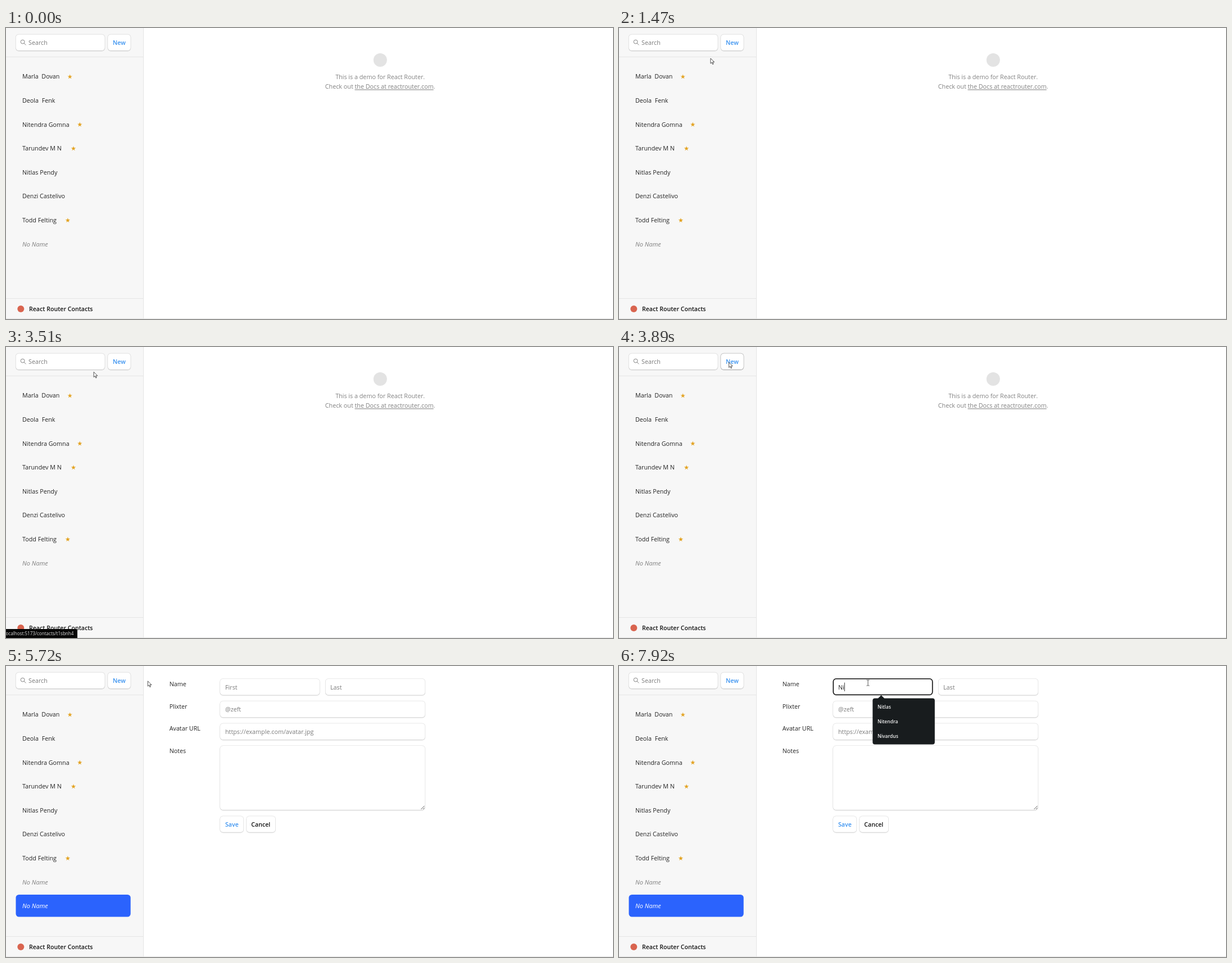
An HTML page that plays this animation: 1080 px wide and 518 px high, repeating every 8 s.

```html
<!DOCTYPE html>
<html lang="en">
<head>
<meta charset="utf-8">
<title>Contacts</title>
<style>
  html, body { margin: 0; width: 100%; height: 100%; overflow: hidden; background: #fff; }
  svg { display: block; width: 100%; height: 100%; }
  text { font: 10.75px "Open Sans", "Noto Sans", sans-serif; fill: #242424; white-space: pre; }
  .bold { font-weight: 600; font-size: 10.6px; fill: #121212; }
  .blue { fill: #3992f0; }
  .soft { fill: #818181; }
  .hint { fill: #7b7b7b; }
  .italic { font-style: italic; font-size: 11px; }
  .mid { text-anchor: middle; }
  .link { text-decoration: underline; }
  .item { font-weight: 600; font-size: 8.5px; fill: #f2f2f2; }
  .status { font-size: 8.1px; fill: #dedede; }
  .white { fill: #fff; }
  .shade { fill: rgba(0,0,0,.07); }
  .edge { fill: rgba(0,0,0,.1); }
  .over .edge { fill: rgba(0,0,0,.26); }
  .line { fill: #e5e5e5; }
  .star { fill: #e3a322; }
  .dark { fill: #181c1e; }
  .cursor { fill: #fff; stroke: #333; stroke-width: .85; stroke-linejoin: round; }
</style>
</head>
<body>
<svg id="stage" viewBox="0 0 1080 518" preserveAspectRatio="none"></svg>
<script>
const LOOP = 8000;
const ROW = { x: 17.5, y: 66.2, w: 204.2, h: 39.5, pitch: 42.6 };

// name, star centre
const people = [
  ["Marla  Dovan", 113.7], ["Deola  Fenk"], ["Nitendra Gomna", 131.3],
  ["Tarundev M N", 120], ["Nitlas Pendy"], ["Denzi Castelivo"],
  ["Todd Felting", 109.9], ["No Name"]
];
const allNames = ["Tarundev", "Todd", "Marla", "Deola", "Denzi", "Nitlas"];
const matches = ["Nitlas", "Nitendra", "Nivardus"];

// time, x, y of the pointer
const path = [
  [330, 985, 516], [490, 861, 420], [780, 861, 420], [900, 392, 220],
  [1230, 392, 220], [1470, 163, 54], [1580, 158, 51], [1750, 158, 51],
  [2000, 146, 80], [2290, 138.7, 87], [3400, 138.7, 87], [3510, 156, 44.5],
  [3780, 192, 28], [4090, 202, 26], [5600, 202, 26], [6180, 443, 30]
];

const text = (x, y, s, cls = "", id = "") =>
  `<text x="${x}" y="${y}" class="${cls}"${id && ` id="${id}"`}>${s}</text>`;
const rect = (x, y, w, h, cls, r = 0, id = "") =>
  `<rect x="${x}" y="${y}" width="${w}" height="${h}" rx="${r}" class="${cls}"${id && ` id="${id}"`}/>`;
const group = (id, ...parts) => `<g${id && ` id="${id}"`}>${parts.join("")}</g>`;

// white panel with a thin edge and a soft shadow below
const box = (x, y, w, h, id = "") => group(id,
  rect(x - .5, y, w + 1, h + 1.8, "shade", 6),
  rect(x - .7, y - .7, w + 1.4, h + 1.7, "edge", 6),
  rect(x, y, w, h, "white", 5.3));

function star(cx, cy) {
  const pts = Array.from({ length: 10 }, (_, i) => {
    const r = i % 2 ? 1.75 : 4.4, a = (i / 5 - .5) * Math.PI;
    return `${(cx + r * Math.cos(a)).toFixed(2)},${(cy + r * Math.sin(a)).toFixed(2)}`;
  });
  return `<polygon class="star" points="${pts.join(" ")}"/>`;
}

function person([name, starX], i) {
  const y = ROW.y + i * ROW.pitch;
  return text(29, y + 24.2, name, starX || i < 7 ? "" : "soft italic") +
    (starX ? star(starX, y + 20.6) : "");
}

function menu(id, names, w, h) {
  return group(id,
    rect(450.8, 57.4, w + 1, h + 1.4, "shade", 4.5),
    `<path class="dark" d="M460.5 58L466.5 52 472.5 58Z"/>`,
    rect(451.3, 57.4, w, h, "dark", 4),
    ...names.map((n, i) => text(460, 76.4 + 25.55 * i, n, "item")));
}

const sidebar = [
  rect(0, 0, 244.5, 518, "", 0, "side"),
  rect(244, 0, 1, 518, "line"), rect(0, 51, 244, 1, "line"), rect(0, 481, 244, 1, "line"),
  box(17.5, 11.5, 158.2, 28.5),
  `<g fill="none" stroke="#858585" stroke-width="1"><circle cx="29.6" cy="24.6" r="3.4"/><path d="M32.1 27.1L35.4 30.4"/></g>`,
  text(40, 30, "Search", "hint"),
  group("new", box(181.2, 11.5, 40.5, 28.5, "newBox"), text(190, 30, "New", "bold blue")),
  rect(ROW.x, 0, ROW.w, ROW.h, "", 5.5, "hover"),
  ...people.map(person),
  group("added",
    `<g fill="#2b63fd">${rect(ROW.x, ROW.y + 8 * ROW.pitch, ROW.w, ROW.h, "", 5.5)}</g>`,
    text(29, ROW.y + 8 * ROW.pitch + 24.2, "No Name", "italic white")),
  `<circle cx="26.3" cy="500" r="6" fill="#d9644f"/>`,
  text(41, 504.2, "React Router Contacts", "bold")
];

const intro = group("intro",
  `<circle cx="665.8" cy="57" r="12" fill="#e3e3e3"/>`,
  group("about",
    text(665.7, 91.3, "This is a demo for React Router.", "soft mid"),
    text(665.7, 108.4, `Check out <tspan class="link">the Docs at reactrouter.com</tspan>.`, "soft mid")));

const form = group("form",
  ...["Name", "Plixter", "Avatar URL", "Notes"].map((s, i) => text(290.7, 35.8 + 39.8 * i, s)),
  box(381, 22.7, 177, 28.8), box(568.6, 22.7, 177, 28.8),
  box(381, 62.5, 364.6, 28.8), box(381, 102.2, 364.6, 28.8), box(381, 142, 364.6, 114),
  text(390, 41.5, "First", "hint", "first"), text(577, 41.5, "Last", "hint"),
  text(390, 81.2, "@zeft", "hint"), text(390, 121, "https://example.com/avatar.jpg", "hint"),
  `<path d="M738.5 255L744.5 249M742 255L744.5 252.5" stroke="#444" stroke-width=".9"/>`,
  box(381, 267.2, 41.5, 28.5), box(428, 267.2, 51.3, 28.5),
  text(390, 285.7, "Save", "bold blue"), text(436.3, 285.7, "Cancel", "bold"),
  group("focus", `<rect x="381.3" y="22.8" width="176.4" height="28.4" rx="5" fill="none" stroke="#111" stroke-width="1.6"/>`),
  text(390, 41.5, "", "", "typed"),
  `<rect id="caret" x="390" y="29.5" width=".9" height="15.5" fill="#222"/>`,
  menu("menuAll", allNames, 111.5, 159.4), menu("menuNi", matches, 110.5, 82));

const overlay = [
  group("status", rect(-4, 502, 131, 20, "", 2), text(-2.6, 513.2, "localhost:5173/contacts/t1sbnh4", "status")),
  `<circle id="flash" cx="442" cy="30" r="8" fill="#fdf25a"/>`,
  group("pointer",
    `<path id="arrow" class="cursor" d="M0 0V9.2L2.2 7.2 3.7 10.7 5.1 10.1 3.7 6.7H6.7Z"/>`,
    `<path id="hand" class="cursor" d="M-1 7.6V1a1 1 0 0 1 2 0V4.8l3.3.8q1.2.3 1 1.6L4.8 10.4 4 13H0L-3.6 8.4q-.2-1.4 1-1.2z"/>`,
    `<path id="beam" fill="none" stroke="#444" stroke-width=".9" d="M-2.5-5H-.8L0-4.3.8-5H2.5M0-4.3V4.3M-2.5 5H-.8L0 4.3.8 5H2.5"/>`)
];

const stage = document.getElementById("stage");
stage.innerHTML = [...sidebar, rect(0, 517, 1080, 1, "line"), intro, form, ...overlay].join("");
const $ = Object.fromEntries([...stage.querySelectorAll("[id]")].map(e => [e.id, e]));
$.side.style.fill = "#f7f7f7";
$.hover.style.fill = "#e3e3e3";
$.status.firstChild.style.fill = "#060606";

const show = (el, on) => { el.style.display = on ? "" : "none"; };
const ramp = (t, a, b) => Math.min(1, Math.max(0, (t - a) / (b - a)));

function pointerAt(t) {
  const i = path.findIndex(p => p[0] > t);
  if (i < 0) return path[path.length - 1].slice(1);
  if (i === 0) return path[0].slice(1);
  const [t0, x0, y0] = path[i - 1], [t1, x1, y1] = path[i];
  const k = ramp(t, t0, t1);
  return [x0 + (x1 - x0) * k, y0 + (y1 - y0) * k];
}

function rowAt(x, y) {
  if (x < ROW.x || x > ROW.x + ROW.w) return -1;
  const i = Math.floor((y - ROW.y) / ROW.pitch);
  return i >= 0 && i < people.length && y - ROW.y - i * ROW.pitch < ROW.h ? i : -1;
}

function draw(t) {
  const [x, y] = pointerAt(t);
  const row = rowAt(x, y), editing = t >= 5420, focused = t >= 6510;
  const overNew = x > 181 && x < 222 && y > 11 && y < 40;
  const overField = editing && x > 381 && y > 22 && y < 52;

  show($.pointer, t >= 330);
  $.pointer.setAttribute("transform", `translate(${x} ${y})`);
  show($.hand, row >= 0);
  show($.beam, overField);
  show($.arrow, row < 0 && !overField);
  show($.hover, row >= 0);
  $.hover.setAttribute("y", ROW.y + row * ROW.pitch);

  $.newBox.classList.toggle("over", overNew);
  $.new.setAttribute("transform", t >= 4250 && t < 4340 ? "translate(0 .7)" : "");
  $.status.style.opacity = ramp(t, 2450, 2540) * (1 - ramp(t, 3650, 3800));

  show($.intro, !editing);
  $.about.style.opacity = 1 - .75 * ramp(t, 4790, 4970);
  show($.form, editing);
  show($.added, editing);

  const typed = t >= 7920 ? "Ni" : t >= 7720 ? "N" : "";
  show($.focus, focused);
  show($.first, !typed);
  $.typed.textContent = typed;
  show($.caret, focused && (t < 7060 || t >= 7580));
  $.caret.setAttribute("x", 390 + (typed ? $.typed.getComputedTextLength() : 0));
  show($.menuAll, focused && !typed);
  show($.menuNi, typed !== "");
  show($.flash, focused && t < 6750);
}

const start = performance.now();
function tick() {
  draw((performance.now() - start) % LOOP);
  requestAnimationFrame(tick);
}
tick();
</script>
</body>
</html>
```
